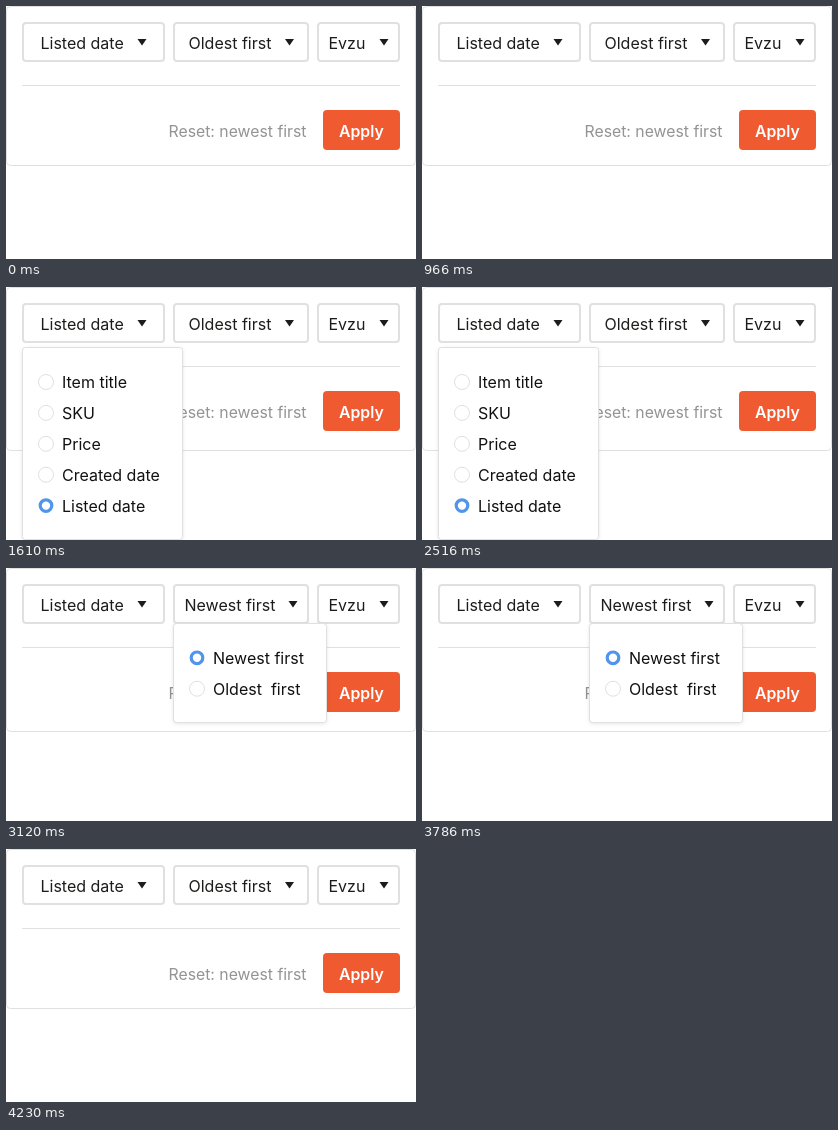
An HTML page with a canvas for the animation above (4.33 s loop, 410x253 px).

```html
<!DOCTYPE html>
<html lang="en">
<head>
<meta charset="utf-8">
<title>Sort menu</title>
<style>
  html, body { margin: 0; width: 100%; height: 100%; overflow: hidden; background: #fff; }
  canvas { display: block; }
</style>
</head>
<body>
<canvas id="stage" width="410" height="253"></canvas>
<script>
const ctx = document.getElementById('stage').getContext('2d');
const LOOP = 4330;
const INK = '#1c1c1a', LINE = '#e0e0df', ORANGE = '#ef5a31', BLUE = '#5094ee';

function box(x, y, w, h, radius, fill, stroke, width = 1) {
  const inset = stroke ? width / 2 : 0;
  ctx.beginPath();
  ctx.roundRect(x + inset, y + inset, w - inset * 2, h - inset * 2, radius);
  ctx.fillStyle = fill;
  ctx.fill();
  if (stroke) {
    ctx.shadowColor = 'transparent';
    ctx.strokeStyle = stroke;
    ctx.lineWidth = width;
    ctx.stroke();
  }
}

function text(label, x, y, color = INK, font = '16px') {
  ctx.font = font + ' Inter, sans-serif';
  ctx.fillStyle = color;
  ctx.fillText(label, x, y);
}

function select(label, x, w, textX, arrowX) {
  box(x, 16, w, 40, 3, '#fff', LINE, 2);
  text(label, textX, 42.5);
  ctx.beginPath();
  ctx.moveTo(arrowX - 4.5, 33);
  ctx.lineTo(arrowX + 4.5, 33);
  ctx.lineTo(arrowX, 39.5);
  ctx.fill();
}

function radio(x, y, on) {
  ctx.beginPath();
  ctx.arc(x, y, on ? 5.8 : 7.5, 0, Math.PI * 2);
  ctx.fillStyle = '#fff';
  ctx.fill();
  ctx.strokeStyle = on ? BLUE : LINE;
  ctx.lineWidth = on ? 3.2 : 1;
  ctx.stroke();
}

function menu(x, y, w, h, options, chosen, firstY) {
  ctx.save();
  ctx.shadowColor = 'rgba(0,0,0,0.12)';
  ctx.shadowBlur = 4;
  ctx.shadowOffsetY = 1;
  box(x, y, w, h, 3, '#fff', LINE);
  ctx.restore();
  options.forEach((label, i) => {
    const cy = firstY + i * 30.9;
    radio(x + 24, cy, i === chosen);
    text(label, x + 40, cy + 6.3, '#111');
  });
}

function draw(open) {
  ctx.fillStyle = '#fff';
  ctx.fillRect(0, 0, 410, 253);
  box(0, 0, 410, open ? 164 : 160, 4, '#fff', LINE);

  const newest = open === 'order';
  select('Listed date', 16, 143, 34.5, 136);
  select(newest ? 'Newest first' : 'Oldest first', 167, 136,
         newest ? 178.5 : 182.5, newest ? 287 : 283.5);
  select('Evzu', 311, 83, 322.5, 378);

  ctx.fillStyle = LINE;
  ctx.fillRect(16, 79, 378, 1);
  text('Reset: newest first', 162.5, 130.5, '#949494', '15.8px');
  box(317, 104, 77, 40, 4, ORANGE);
  text('Apply', 333, 130.5, '#fff', '600 15.8px');

  if (open === 'field') {
    menu(16, 60, 161, 193,
         ['Item title', 'SKU', 'Price', 'Created date', 'Listed date'], 4, 95);
  } else if (newest) {
    menu(167, 55, 154, 100, ['Newest first', 'Oldest  first'], 0, 89.8);
  }
}

function openMenu(t) {
  if (t >= 1610 && t < 3120) return 'field';
  if (t >= 3120 && t < 4230) return 'order';
  return '';
}

const start = performance.now();
function frame() {
  draw(openMenu((performance.now() - start) % LOOP));
  requestAnimationFrame(frame);
}
frame();
</script>
</body>
</html>
```
